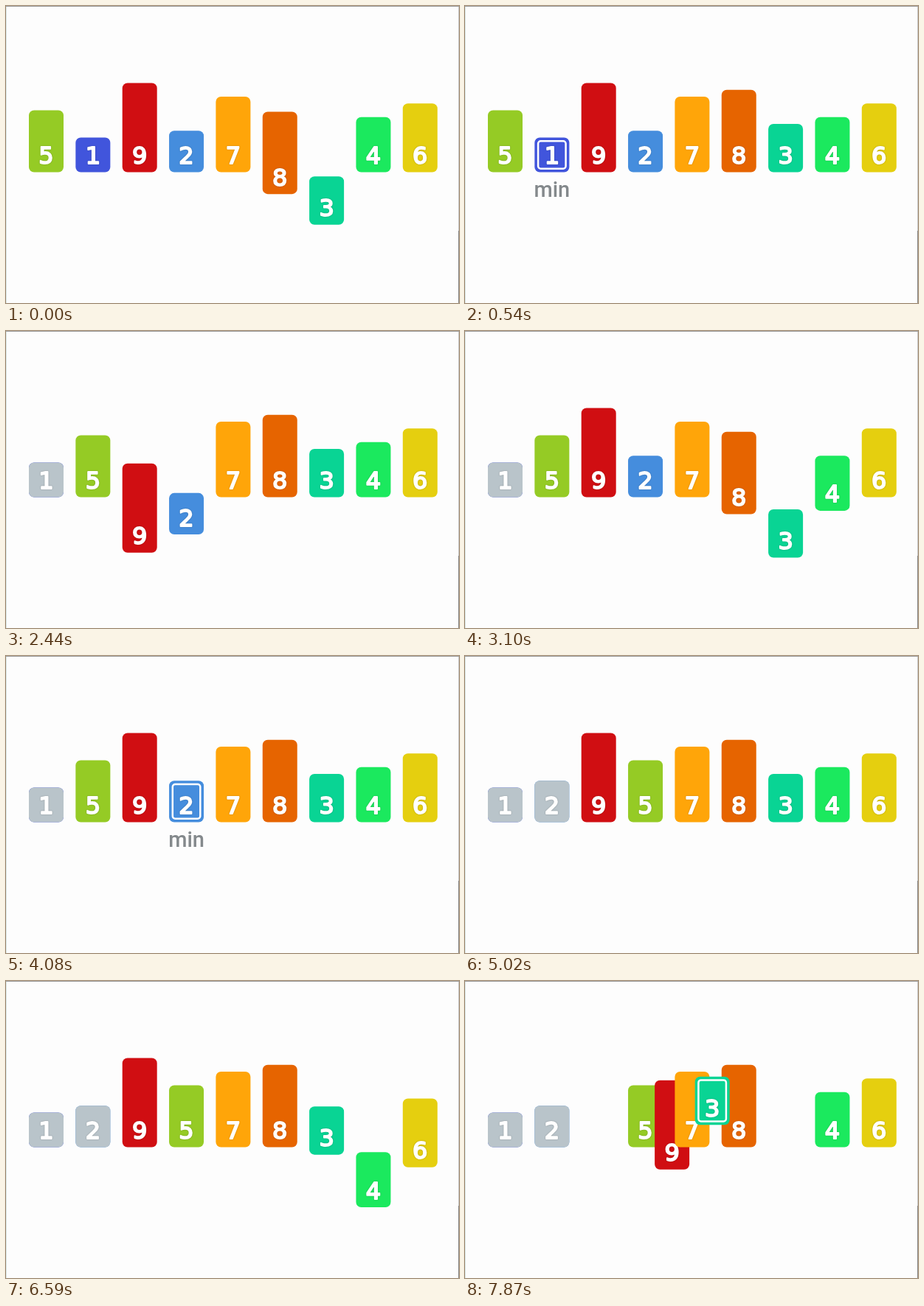
These frames come from a looping animation (614x403 px, 7.99 s). An HTML page with a canvas:

```html
<!DOCTYPE html>
<html lang="en">
<head>
<meta charset="utf-8">
<title>Selection sort</title>
<style>
html, body { margin: 0; width: 100%; height: 100%; overflow: hidden; background: #fdfdfd; }
canvas { display: block; }
</style>
</head>
<body>
<canvas id="stage" width="614" height="403"></canvas>
<script>
const ctx = document.getElementById('stage').getContext('2d');
const LOOP = 7990;
const BASE = 225.5, BAR_W = 47, LEFT = 31, PITCH = 63.35;
const DIP = 82, ARC = 31, SWAP_TIME = 420, FADE = 100;
const GRAY = '#b9c4ca';

const VALUES = [5, 1, 9, 2, 7, 8, 3, 4, 6];
const COLORS = ['#4155dc', '#458ddd', '#09d494', '#1be95e', '#95cb25',
                '#e5cf0f', '#ffa509', '#e66400', '#d00e12'];

// Each pass: a wave of dips from slot `first`, then the minimum is marked and swapped there.
const PASSES = [
  { first: 0, min: 1, wave: -1011, step: 153, dip: 280, mark: 440, swap: 1130 },
  { first: 1, min: 3, wave: 1990, step: 180, dip: 430, mark: 3740, swap: 4450 },
  { first: 2, min: 6, wave: 5378, step: 194, dip: 455, mark: 7030, swap: 7690 }
];

const ramp = (t, start, length) => Math.min(1, Math.max(0, (t - start) / length));

function layout(t) {
  const bars = VALUES.map((value, slot) =>
    ({ value, slot, dx: 0, dy: 0, frame: 0, label: 0, gray: 0 }));

  for (const pass of PASSES) {
    const swapEnd = pass.swap + SWAP_TIME;
    const left = bars.find(b => b.slot === pass.first);
    const min = bars.find(b => b.slot === pass.min);

    for (const bar of bars) {
      if (bar.slot < pass.first) continue;
      const start = pass.wave + (bar.slot - pass.first) * pass.step;
      bar.dy += DIP * Math.sin(Math.PI * ramp(t, start, pass.dip));
    }

    const shown = ramp(t, pass.mark, FADE);
    min.gray = ramp(t, swapEnd, FADE);
    min.frame = shown - min.gray;
    min.label = shown - ramp(t, pass.swap, FADE);

    if (t >= swapEnd) {
      [left.slot, min.slot] = [min.slot, left.slot];
      continue;
    }
    const angle = Math.PI * ramp(t, pass.swap, SWAP_TIME);
    const shift = (pass.min - pass.first) * PITCH * (1 - Math.cos(angle)) / 2;
    const lift = ARC * Math.sin(angle);
    left.dx = shift;
    left.dy += lift;
    min.dx = -shift;
    min.dy -= lift;
    break;
  }
  return bars;
}

function roundRect(x, y, w, h, r) {
  ctx.beginPath();
  ctx.roundRect(x, y, w, h, r);
}

function drawBar(bar) {
  const h = 47 + 9.25 * (bar.value - 1);
  const x = LEFT + bar.slot * PITCH + bar.dx;
  const bottom = BASE + bar.dy;
  const y = bottom - h;
  const center = x + BAR_W / 2;

  roundRect(x, y, BAR_W, h, 7);
  ctx.fillStyle = COLORS[bar.value - 1];
  ctx.fill();
  ctx.globalAlpha = bar.gray;
  ctx.fillStyle = GRAY;
  ctx.fill();

  ctx.globalAlpha = bar.frame;
  ctx.strokeStyle = '#fff';
  ctx.lineWidth = 2.5;
  roundRect(x + 4.75, y + 4.75, BAR_W - 9.5, h - 9.5, 3.5);
  ctx.stroke();

  ctx.globalAlpha = bar.label;
  ctx.font = '500 29px Roboto, sans-serif';
  ctx.fillStyle = '#84898c';
  ctx.fillText('min', center, 259);

  ctx.globalAlpha = 1;
  ctx.font = '32px "DejaVu Sans", sans-serif';
  ctx.lineWidth = 2;
  ctx.fillStyle = '#fff';
  ctx.shadowColor = 'rgba(0, 0, 0, 0.25)';
  ctx.shadowBlur = 2;
  ctx.strokeText(bar.value, center, bottom - 11.5);
  ctx.shadowColor = 'transparent';
  ctx.fillText(bar.value, center, bottom - 11.5);
}

function drawStage() {
  const rect = (color, ...box) => {
    ctx.fillStyle = color;
    ctx.fillRect(...box);
  };
  rect('#fdfdfd', 0, 0, 614, 403);
  rect('#d8e6e4', 0, 0, 1, 403);
  rect('#c8c8c8', 613, 0, 1, 305);
  rect('#888', 613, 305, 1, 98);
  rect('#9c9c9c', 0, 0, 614, 1);
}

function draw(now) {
  drawStage();
  layout(now % LOOP).forEach(drawBar);
  requestAnimationFrame(() => draw(performance.now() - begin));
}

ctx.textAlign = 'center';
ctx.lineJoin = 'round';
const begin = performance.now();
draw(0);
</script>
</body>
</html>
```
